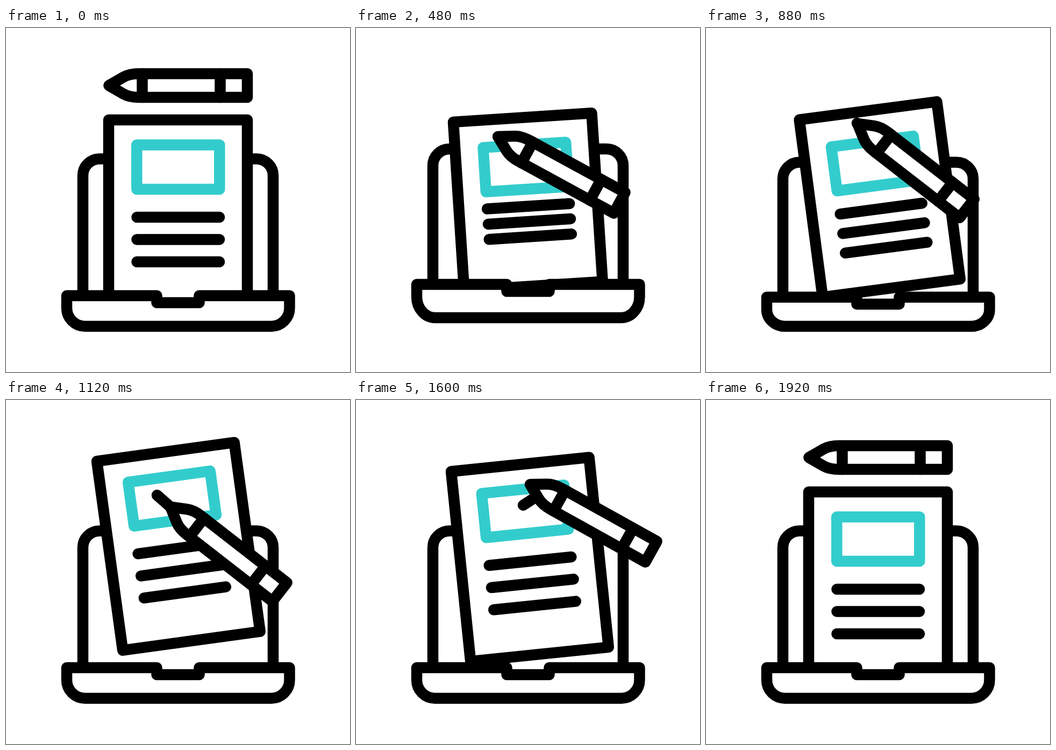
An HTML page with a canvas that plays this animation: 640 by 640 pixels, repeating every 2000 ms.

```html
<!DOCTYPE html>
<html>
<head>
<meta charset="utf-8">
<style>
html, body { margin: 0; height: 100%; overflow: hidden; background: #fff; }
canvas { display: block; }
</style>
</head>
<body>
<canvas id="stage" width="640" height="640"></canvas>
<script>
const ctx = document.getElementById('stage').getContext('2d');
const LOOP = 2000, STEP = 40;

// Shared key times; a track with fewer values keeps its last one.
const KEYS = [100, 240, 360, 480, 760, 1080, 1440, 1600, 1760, 1920];
const page = {
  x: [191, 188, 184.5, 181, 177, 169, 169, 177, 186.5, 191],
  y: [171, 136, 143, 175, 197, 114, 114, 133, 159, 171],
  angle: [0, -.75, -2.1, -3.7, -7.1, -7.8, -7.8, -5.85, -1.9, 0],
  height: [355, 345, 328, 314, 320, 355],
  box: [46.5, 40, 44, 51, 63, 46.5],
  text: [181, 162.6, 161, 165.3, 185, 181],
  gap: [41.5, 35.2, 30.5, 28.4, 33, 41.5]
};
const laptop = {
  lid: [243.5, 220.5, 212, 225, 252.5, 243.5],
  top: [498, 475.5, 467, 477, 502, 498],
  bottom: [555, 539, 533, 539, 555, 555]
};
const pencil = {
  x: [191.5, 215.5, 240, 264, 281, 281, 349, 324, 254, 191.5],
  y: [107, 172.5, 194, 202, 177.5, 177.5, 171, 157, 132, 107],
  angle: [0, 9.2, 19.5, 28.6, 37.7, 37.9, 37.9, 29.1, 15, 0]
};

// The written tick: start, corner, end.
const TICK = [[281, 177], [306, 199], [349, 171]];
const dist = (p, q) => Math.hypot(q[0] - p[0], q[1] - p[1]);
const LEG = dist(TICK[0], TICK[1]), LENGTH = LEG + dist(TICK[1], TICK[2]);

// Monotone cubic interpolation, resting at both ends.
function track(t, values, keys = KEYS) {
  const last = values.length - 1;
  if (t <= keys[0]) return values[0];
  if (t >= keys[last]) return values[last];
  let i = 0;
  while (t >= keys[i + 1]) i++;
  const slope = k => (values[k + 1] - values[k]) / (keys[k + 1] - keys[k]);
  const tangent = k => {
    if (k === 0 || k === last) return 0;
    const a = slope(k - 1), b = slope(k);
    return a * b > 0 ? 2 * a * b / (a + b) : 0;
  };
  const d = keys[i + 1] - keys[i], u = (t - keys[i]) / d, v = 1 - u;
  return v * v * (1 + 2 * u) * values[i] + u * u * (1 + 2 * v) * values[i + 1]
    + d * u * v * (v * tangent(i) - u * tangent(i + 1));
}

function pose(t, tracks) {
  const p = {};
  for (const k in tracks) p[k] = track(t, tracks[k]);
  return p;
}

function shape(d, fill, color = '#000') {
  const path = new Path2D(d);
  if (fill) {
    ctx.fillStyle = '#fff';
    ctx.fill(path);
  }
  ctx.strokeStyle = color;
  ctx.stroke(path);
}

function placed(p, draw) {
  ctx.save();
  ctx.translate(p.x, p.y);
  ctx.rotate(p.angle * Math.PI / 180);
  draw(p);
  ctx.restore();
}

function drawPage(p) {
  shape(`M0 0H258V${p.height}H0Z`, true);
  shape(`M52.3 ${p.box}h154v82.5h-154Z`, false, '#3cc');
  for (let i = 0; i < 3; i++) shape(`M52.5 ${p.text + i * p.gap}h153.5`);
}

function drawLid({ lid, top }) {
  shape(`M143 ${top}V${lid + 31}a31 31 0 0 1 31 -31H466a31 31 0 0 1 31 31V${top}`);
}

function drawBase({ top, bottom }) {
  const ry = bottom - top - 23;
  shape(`M113 ${top}H280.5v13H359.5v-13H527.5v23a34 ${ry} 0 0 1 -34 ${ry}
    H147a34 ${ry} 0 0 1 -34 ${-ry}Z`, true);
}

function drawPencil() {
  shape('M0 0L27 -15.6Q38 -22 56 -22H257.5V22H56Q38 22 27 15.6Z', true);
  shape('M62 -22V22M207 -22V22');
}

function tickPoint(s) {
  const [a, b, c] = TICK;
  const [p, q, u] = s < LEG ? [a, b, s / LEG] : [b, c, (s - LEG) / (LENGTH - LEG)];
  return [p[0] + (q[0] - p[0]) * u, p[1] + (q[1] - p[1]) * u];
}

function drawTick(from, to) {
  if (to <= from) return;
  const points = [tickPoint(from)];
  if (from < LEG && to > LEG) points.push(TICK[1]);
  points.push(tickPoint(to));
  shape('M' + points.join('L'));
}

function draw(t) {
  ctx.fillStyle = '#fff';
  ctx.fillRect(0, 0, 640, 640);
  ctx.lineWidth = 20.5;
  ctx.lineCap = ctx.lineJoin = 'round';

  const body = pose(t, laptop), pen = pose(t, pencil);
  const written = track(t, [0, LEG, LEG + 10.8, LENGTH], [840, 1120, 1200, 1360]);
  const erased = track(t, [0, LEG + 6, LENGTH], [1400, 1600, 1840]);
  if (t >= 800 && t <= 1440) [pen.x, pen.y] = tickPoint(written);

  drawLid(body);
  placed(pose(t, page), drawPage);
  drawBase(body);
  drawTick(erased, written);
  placed(pen, drawPencil);
}

function frame() {
  draw(Math.floor(performance.now() % LOOP / STEP) * STEP);
  requestAnimationFrame(frame);
}
frame();
</script>
</body>
</html>
```
